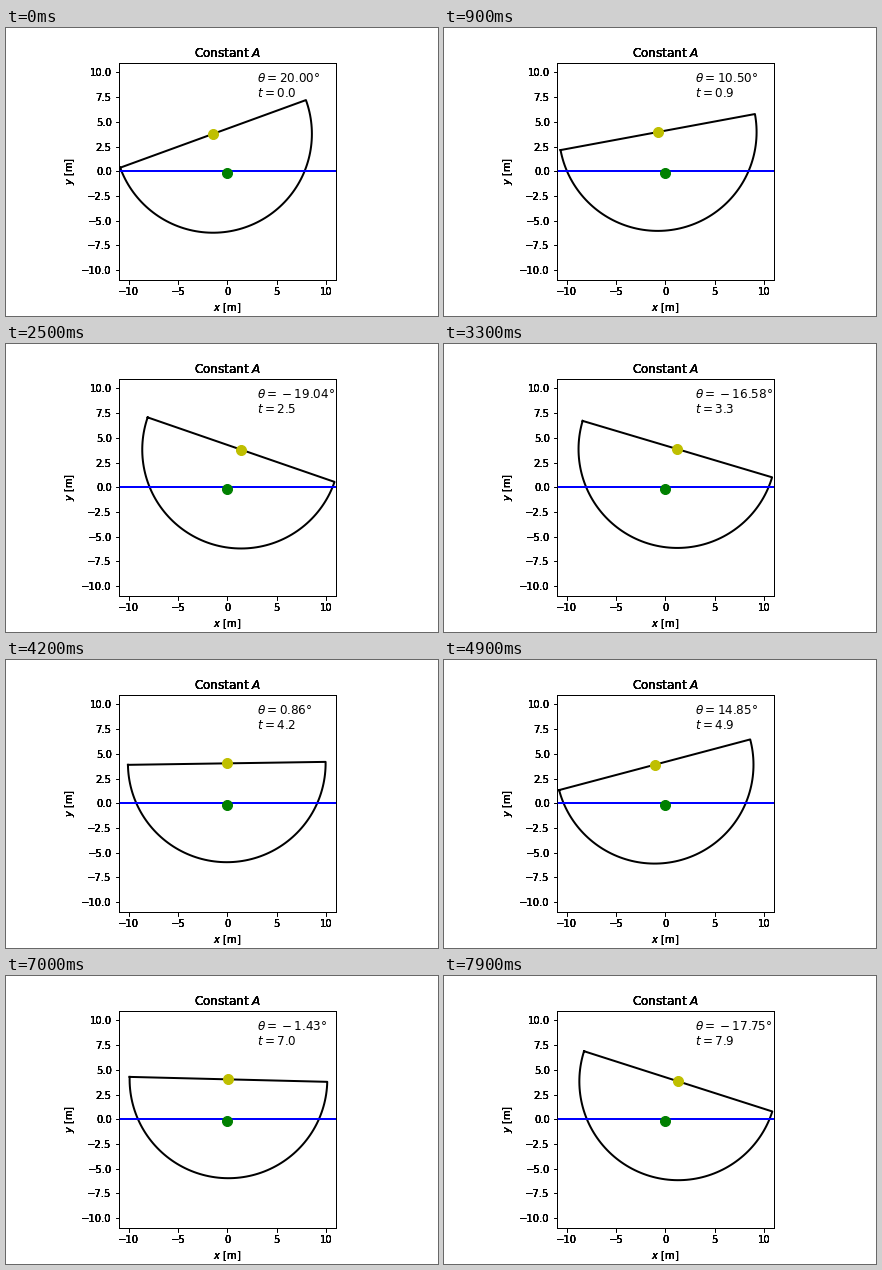
Recreate the animation shown at these times as a matplotlib script. Size 432 px wide and 288 px high, loop 8000 ms.

```python
import numpy as np
import matplotlib.pyplot as plt
from matplotlib.animation import FuncAnimation

R = 10.0                        # radius of the half disc
H = 4 * R / (3 * np.pi)         # centre of mass below the flat side
A = 9.81 * H / (R**2 / 2 - H**2)
Y_MASS = 0.40397 * R - H        # floats with half its area submerged
FRAMES, DT, SUBSTEPS = 80, 0.1, 20
LAYERS = 5                      # stacked labels give the heavy lettering


def swing(theta, n):
    """Angles of theta'' = -A sin(theta) at n times, DT apart, from rest."""
    def rate(s):
        return np.array([s[1], -A * np.sin(s[0])])

    s, h, out = np.array([theta, 0.0]), DT / SUBSTEPS, []
    for _ in range(n):
        out.append(s[0])
        for _ in range(SUBSTEPS):
            a = rate(s)
            b = rate(s + h / 2 * a)
            c = rate(s + h / 2 * b)
            d = rate(s + h * c)
            s = s + h / 6 * (a + 2 * b + 2 * c + d)
    return out


def make_axes(fig):
    ax = fig.add_axes([54 / 432, 0.125, 0.775, 0.755])
    ax.set_aspect("equal")
    ax.set(xlim=(-11, 11), ylim=(-11, 11))
    ax.set_xticks(np.arange(-10, 11, 5))
    ax.set_yticks(np.arange(-10, 10.1, 2.5))
    ax.set_title("Constant $A$")
    ax.set_xlabel("$x$ [m]")
    ax.set_ylabel("$y$ [m]")
    ax.patch.set_visible(False)
    return ax


plt.rcParams.update({"font.family": "DejaVu Sans", "font.size": 10})
fig = plt.figure(figsize=(6, 4), dpi=72, facecolor="white")
ax = [make_axes(fig) for _ in range(LAYERS)][-1]

hull, = ax.plot([], [], "k", lw=2)
ax.plot([-11, 11], [0, 0], "b", lw=2)
pivot, = ax.plot([], [], "yo", ms=10)
ax.plot([0], [Y_MASS], "go", ms=10)
angle_text = ax.text(3, 9, "", fontsize=12)
time_text = ax.text(3, 7.5, "", fontsize=12)

angles = swing(np.radians(20), FRAMES)
arc = np.linspace(np.pi, 2 * np.pi, 100)


def update(i):
    th = angles[i]
    x, y = -H * np.sin(th), Y_MASS + H * np.cos(th)
    phi = np.append(arc, np.pi) + th
    hull.set_data(x + R * np.cos(phi), y + R * np.sin(phi))
    pivot.set_data([x], [y])
    angle_text.set_text(rf"$\theta = {np.degrees(th):.2f}\degree$")
    time_text.set_text(f"$t = {i * DT:.1f}$")
    return hull, pivot, angle_text, time_text


anim = FuncAnimation(fig, update, frames=FRAMES, interval=100,
                     repeat=True, repeat_delay=0)
plt.show()
```
